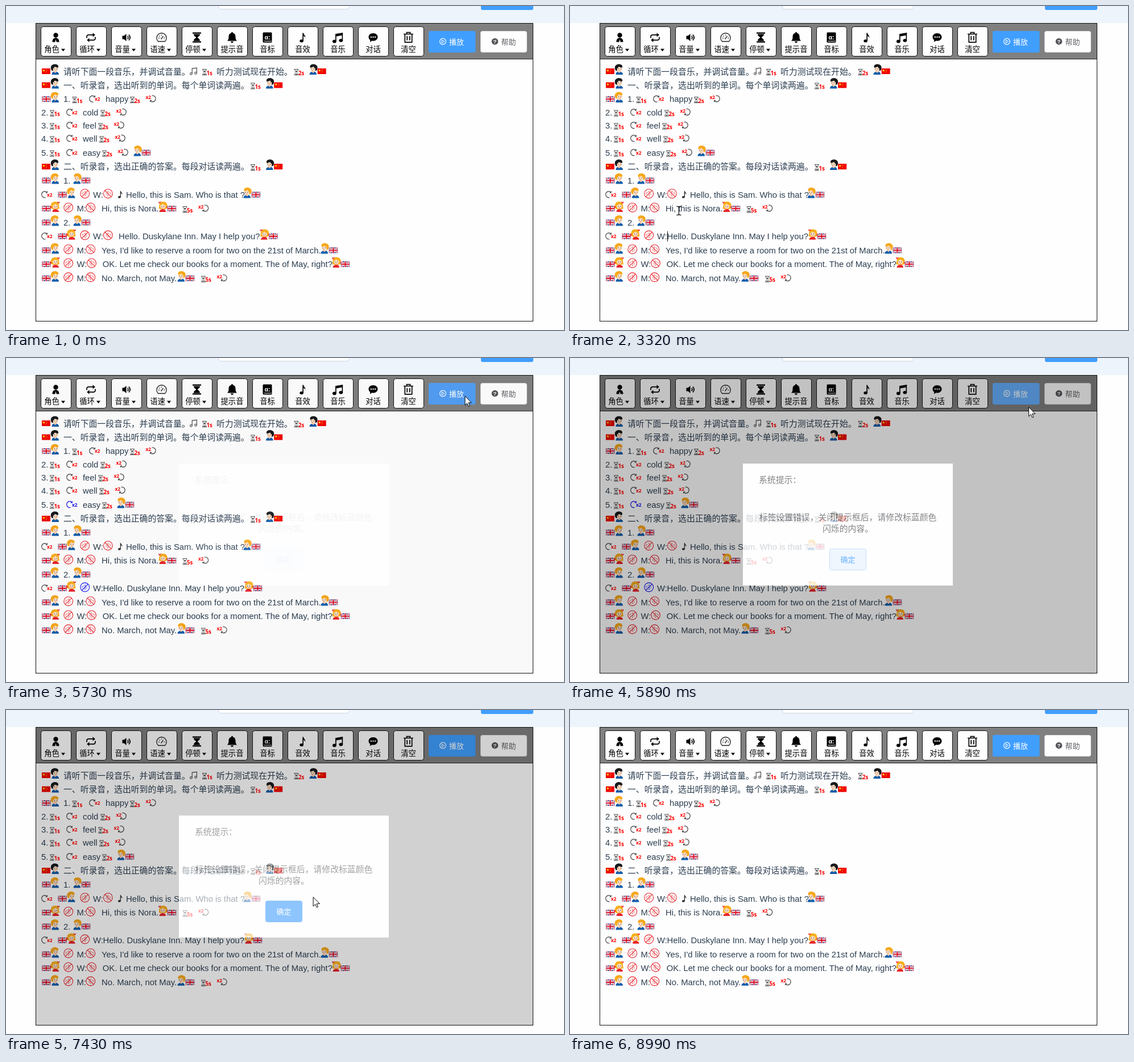
Recreate the animation shown at these times as an HTML page. Size 981x571 px, loop 9310 ms.

```html
<!DOCTYPE html>
<html lang="zh">
<head>
<meta charset="utf-8">
<title>Listening script editor</title>
<style>
html, body { margin: 0; width: 100%; height: 100%; overflow: hidden; background: #fefefe; }
svg { display: block; }
text { font-family: "Liberation Sans", "Noto Sans CJK SC", sans-serif; white-space: pre; }
.body { font-size: 14.8px; fill: #2c3e50; }
.han { font-size: 14.85px; }
.tag { font: bold 9.8px "Open Sans", sans-serif; fill: var(--r, #f00); }
.times { font-size: 8.3px; }
.line { fill: none; stroke: var(--k, #444); stroke-width: 1.2; }
.ban { fill: none; stroke: var(--r, #e8242c); stroke-width: 1.1; }
.thin { stroke-width: .6; }
.blue { --r: #1414f0; --k: #1414f0; }
.ui { font-size: 13.33px; }
.btn { font-size: 13px; font-weight: 500; }
.pop { font-size: 14.85px; fill: #606266; }
</style>
</head>
<body>
<svg id="stage" width="981" height="571" viewBox="0 0 981 571">
  <defs>
    <g id="cn">
      <path d="M0 0H15V10H0Z" fill="#f00000"/>
      <path d="M3.5 1.2l.7 1.6 1.7.1-1.3 1.1.4 1.7-1.5-.9-1.5.9.4-1.7-1.3-1.1 1.7-.1Z" fill="#ffde00"/>
      <path d="M7 1h1v1h-1zM8.3 2.6h1v1h-1zM8.3 4.6h1v1h-1zM7 6h1v1h-1z" fill="#ffc400"/>
    </g>
    <g id="uk">
      <path d="M0 0H15.5V10H0Z" fill="#1b2f7c"/>
      <path d="M0 0L15.5 10M15.5 0L0 10" stroke="#fff" stroke-width="2.4"/>
      <path d="M0 0L15.5 10M15.5 0L0 10" stroke="#d8142c" stroke-width=".9"/>
      <path d="M7.75 0V10M0 5H15.5" stroke="#fff" stroke-width="4"/>
      <path d="M7.75 0V10M0 5H15.5" stroke="#d8142c" stroke-width="2.2"/>
    </g>
    <g id="boy">
      <path d="M3 19C3 15.5 5 13.6 8.5 13.6S15.5 15 15.5 19Z" fill="#0f5cab"/>
      <path d="M7 12h4v2.5l-2 1.5-2-1.5Z" fill="#f6c9a0"/>
      <circle cx="9.2" cy="8.6" r="5" fill="#fde0c4"/>
      <path d="M2.6 11.5C.6 8 .8 3.4 4.2 1.8 6 .2 10 0 12.2 1.2 14.6 2.2 15 4.6 14.2 6.6 12 6.8 10 6 8.4 4.8 7.6 6.6 6 7.4 5.2 8.6L5.4 12.6Z" fill="var(--hair)"/>
      <path d="M8 8.2v1.4M12 8.2v1.4" stroke="#333"/>
      <path d="M9 11.4q1.2 1 2.2 0" fill="none" stroke="#c33" stroke-width=".7"/>
    </g>
    <g id="girl">
      <path d="M4 19C4 15.6 6 14 9 14S15.5 15.6 15.5 19Z" fill="#e6262c"/>
      <path d="M2.4 13C.4 9 1.2 2.4 5.4 1.4 9-.2 14 .8 15 4.2 16 7 15.6 10 16.4 13L13.4 14H5Z" fill="#f8ae1c"/>
      <circle cx="9.2" cy="8.8" r="4.6" fill="#fde0c4"/>
      <path d="M4.8 7.4C7 7 8.4 5.8 9.4 4.6 10.6 6 12 6.8 14 7.2L12.6 3H6.4Z" fill="#f8ae1c"/>
      <path d="M0 8l3.4 2.4L0 13ZM12.4 0l2 2L17 .4 16.2 4 13 3Z" fill="#ee2a2a"/>
      <path d="M7.6 8.4v1.4M11.4 8.4v1.4" stroke="#333"/>
      <path d="M8.4 11.4q1.1 1 2.2 0" fill="none" stroke="#c33" stroke-width=".7"/>
    </g>
    <g id="glass">
      <path d="M0 0H8V1H0ZM0 10H8V11H0Z" fill="#444"/>
      <path d="M1.2 1V3L3.4 5.5 1.2 8V10M6.8 1V3L4.6 5.5 6.8 8V10" fill="none" stroke="#444" stroke-width=".8"/>
      <path d="M2 3H6L4 5.4ZM2 9.8L4 7.4 6 9.8Z" fill="#444"/>
    </g>
    <g id="turn">
      <path class="line" d="M7 12A5.5 5.5 0 1 1 8.6 2"/>
      <path d="M10.4 .3V4H6.6Z" style="fill:var(--k,#444)"/>
    </g>
    <g id="mute">
      <circle class="ban" cx="8.7" cy="8.7" r="7.9"/>
      <path class="ban" d="M3.2 14.2L14.2 3.2"/>
      <path class="ban thin" d="M4 7H6.2L9.4 4V13.4L7.4 11.6M4 7V10.4M11.4 7.6q1.6 1.6 0 3.6"/>
    </g>
    <g id="note">
      <ellipse cx="2.4" cy="10.8" rx="2.5" ry="2"/>
      <path d="M3.7 0H5C5 2.4 8 3 7.4 6.8 7 5 6 4.4 5 4.2V10.8H3.7Z"/>
    </g>
    <g id="notes">
      <ellipse cx="2.4" cy="11" rx="2.4" ry="2"/><ellipse cx="10.6" cy="9.8" rx="2.4" ry="2"/>
      <path d="M3.6 1.6L13 0V9.8H11.8V3.4L4.8 4.6V11H3.6Z"/>
    </g>
    <g id="tune" fill="none" stroke="#444" stroke-width="1.1">
      <circle cx="2.4" cy="10.8" r="1.8"/><circle cx="10.6" cy="9.8" r="1.8"/>
      <path d="M4.2 10.8V1.6L12.4 .6V9.8"/>
    </g>
  </defs>
</svg>
<script>
const LOOP = 9310;
const stage = document.getElementById('stage');
const $ = id => document.getElementById(id);

const text = (x, y, s, cls, extra = '') => `<text x="${x}" y="${y}" class="${cls}" ${extra}>${s}</text>`;
const rect = (x, y, w, h, fill, extra = '') => `<rect x="${x}" y="${y}" width="${w}" height="${h}" fill="${fill}" ${extra}/>`;
const path = (d, extra = '') => `<path d="${d}" ${extra}/>`;
const use = (id, x, y, extra = '') => `<use href="#${id}" transform="translate(${x} ${y}) ${extra}"/>`;
const group = (id, s) => `<g id="${id}">${s}</g>`;

// Inline pieces; c is the middle of the text line.
const say = (x, c, s) => text(x, c + 5.3, s, /[\u4e00-\u9fff]/.test(s) ? 'body han' : 'body');
const wait = (x, c, n) => use('glass', x, c - 4) + text(x + 7.5, c + 6.5, n + 's', 'tag');
const x2 = (x, y) => text(x, y, 'x2', 'tag times');
const from = (x, c) => use('turn', x - 1, c - 7) + x2(x + 8.4, c + 3);
const to = (x, c) => use('turn', x + 7, c - 8, 'rotate(180 5.2 7)') + x2(x - .5, c);
const mute = (x, c) => use('mute', x, c - 10.5);
const unmute = (x, c) => use('mute', x + 17.4, c - 10.5, 'scale(-1 1)');
const person = (who, x, c, flip) =>
  `<g style="--hair:${who === 'cn' ? '#17191c' : '#f6a81c'}">` +
  use(who === 'girl' ? 'girl' : 'boy', flip ? x + 16 : x, c - 13, flip ? 'scale(-1 1)' : '') + '</g>';
const flag = (who, x, c) => use(who === 'cn' ? 'cn' : 'uk', x, c - 5);
const open = (who, x, c) => flag(who, x, c) + person(who, x + 14.5, c);
const close = (who, x, c) => person(who, x, c, true) + flag(who, x + 14.7, c);

function page() {
  return rect(0, 0, 981, 30, '#edf4fc') +
    rect(373.5, -10.5, 230, 16, '#fff', 'rx="4" stroke="#d3d7de"') +
    rect(835, -10, 92, 17, '#409eff', 'rx="3"') +
    rect(52.5, 30.5, 874, 525, '#fefefe', 'stroke="#111"') +
    rect(53, 31, 873, 63, '#808080') + rect(53, 93, 873, 1, '#222');
}

function tools() {
  const pen = 'fill="none" stroke="#000" stroke-width="1.7"';
  // Icons are drawn around the origin.
  const list = [
    ['角色', path('M-4.2-4a4.2 4.2 0 1 1 8.4 0a4.2 4.2 0 0 1-8.4 0M-6 8C-6 3-3.6.8 0 .8S6 3 6 8H1.2L0 3-1.2 8Z')],
    ['循环', path('M-7.5 1V-1Q-7.5-4.6-4-4.6H4M7.5-1V1Q7.5 4.6 4 4.6H-4', pen) + path('M3-8.2V-1L7.4-4.6ZM-3 8.2V1L-7.4 4.6Z')],
    ['音量', path('M-7-3H-4L0-6.5V6.5L-4 3H-7Z') + path('M2.2-2.8q2.4 2.8 0 5.6M4.4-5q4.4 5 0 10', pen)],
    ['语速', path('M-6 7A8.6 8.6 0 1 1 6 7ZM-1 3L3-2.6M-5.4 1h1.6M0-5v1.6M4 1h1.6M-4-3l1 1', 'fill="none" stroke="#222" stroke-width="1.3"')],
    ['停顿', path('M-7.5-9H7.5V-6.8H-7.5ZM-7.5 6.8H7.5V9H-7.5ZM-5.5-6H5.5C5.5-2.6 2.4-1.6 1.2 0 2.4 1.6 5.5 2.6 5.5 6.2H-5.5C-5.5 2.6-2.4 1.6-1.2 0-2.4-1.6-5.5-2.6-5.5-6Z')],
    ['提示音', path('M-1.2-9.5H1.2V-8C5-7 6-4.4 6-1 6 3 7 4.4 8.5 6H-8.5C-7 4.4-6 3-6-1-6-4.4-5-7-1.2-8ZM-2.6 7H2.6Q2 9.6 0 9.6T-2.6 7Z')],
    ['音标', rect(-8, -9, 16, 18, '#000', 'rx="1.5"') + text(-5, 3, 'α:', '', 'fill="#fff" font-size="11" font-weight="bold"') + rect(-6, 6, 13, 1, '#fff')],
    ['音效', use('note', -5, -8, 'scale(1.3)')],
    ['音乐', use('notes', -9.5, -8.5, 'scale(1.4)')],
    ['对话', path('M0-7.5C4.6-7.5 8-4.6 8-.8S4.6 6 0 6L-2 5.8-5.6 8-5.2 4.4C-7 3.2-8 1.4-8-.8-8-4.6-4.6-7.5 0-7.5Z') +
      [-3.6, 0, 3.6].map(x => `<circle cx="${x}" cy="-.8" r="1.2" fill="#fff"/>`).join('')],
    ['清空', path('M-8.5-6H8.5M-3-6V-8.8H3V-6M-6.2-6V8.4H6.2V-6M-2.3-2.5V5M2.3-2.5V5', pen)],
  ];
  return list.map(([name, icon], i) => {
    const x = 61.5 + 62 * i, mid = x + 26, drop = i < 5;
    return rect(x, 36.5, 53, 52, '#fefefe', 'rx="4" stroke="#111"') +
      `<g transform="translate(${mid} 55.5)">${icon}</g>` +
      text(drop ? mid - 7 : mid, 81.3, name, 'ui', 'text-anchor="middle"') +
      (drop ? path(`M${mid + 9.5} 75.5h7l-3.5 4.5Z`) : '');
  }).join('') +
    rect(743, 44, 82.5, 38, '#409eff', 'rx="3" id="play"') +
    `<circle cx="768" cy="62.5" r="5.3" fill="none" stroke="#fff" stroke-width="1.2"/>` +
    path('M766.4 59.8V65.2L770.8 62.5Z', 'fill="none" stroke="#fff"') +
    text(779, 67.8, '播放', 'btn', 'fill="#fff"') +
    rect(834.5, 44.5, 81, 37, '#fefefe', 'rx="3" stroke="#dcdfe6" id="help"') +
    `<circle cx="859.5" cy="62.5" r="5.8" fill="#55575b"/>` +
    text(859.5, 66, '?', '', 'fill="#fff" font-size="9.5" font-weight="bold" text-anchor="middle"') +
    text(870.5, 67.8, '帮助', 'btn', 'fill="#606266"');
}

function script() {
  let s = open('cn', 63, 115) + say(101, 115.5, '请听下面一段音乐，并调试音量。') + use('tune', 323, 108.5) +
    wait(345, 115, 1) + say(370, 115.5, '听力测试现在开始。') + wait(506.5, 115, 2) + close('cn', 533, 115);
  s += open('cn', 63, 139.5) + say(101, 140, '一、听录音，选出听到的单词。每个单词读两遍。') + wait(430, 139.5, 1) + close('cn', 456.5, 139.5);
  s += open('uk', 63, 164) + say(101, 164, '1.') + wait(116.5, 164, 1) + from(147.5, 164) + say(175, 164, 'happy') + wait(218, 164, 2) + to(246, 164);
  [['cold', 187.5, 166], ['feel', 210.5, 162], ['well', 233.5, 164], ['easy', 258.5, 169]].forEach(([word, c, x], i) => {
    const last = i === 3;
    s += say(62, c, i + 2 + '.') + wait(77, c, 1) + group('loop' + i, from(107.5, c)) + say(135, c, word) + wait(x, c, 2) +
      group('end' + i, to(x + 28, c)) + (last ? group('tail7', close('uk', 224, c)) : '');
  });
  s += open('cn', 63, 283) + say(101, 283, '二、听录音，选出正确的答案。每段对话读两遍。') + wait(430, 283, 1) + close('cn', 456.5, 283);
  [[307.5, '1.'], [381.5, '2.']].forEach(([c, n]) => s += open('uk', 63, c) + say(101, c, n) + close('uk', 118, c));

  s += from(63.5, 332.5) + open('uk', 91.5, 332.5) + mute(130, 332.5) + say(153, 332.5, 'W:') + unmute(170.7, 332.5) +
    `<g fill="#333">${use('note', 197, 326)}</g>` + say(211, 332.5, 'Hello, this is Sam. Who is that ?') + close('uk', 417, 332.5);
  s += open('girl', 63, 357) + mute(101, 357) + say(124.5, 357, 'M:') + unmute(140, 357) + say(168, 357, 'Hi, this is Nora.') +
    close('girl', 269, 357) + wait(310.5, 357, 5) + to(338.5, 357);
  s += from(63.5, 405.8) + open('girl', 91.5, 405.8) + group('ban', mute(130, 405.8)) + say(153, 405.8, 'W:') + group('unban', unmute(170.7, 405.8)) +
    group('tail13', say(198, 405.8, 'Hello. Duskylane Inn. May I help you?') + close('girl', 447.5, 405.8));
  const reply = (who, c, role, x, line, end) =>
    open(who, 63, c) + mute(101, c) + say(124.5, c, role) + unmute(x, c) + say(x + 28, c, line) + close(who, end, c);
  s += reply('uk', 430.5, 'M:', 140, "Yes, I'd like to reserve a room for two on the 21st of March.", 553);
  s += reply('girl', 455, 'W:', 141.8, 'OK. Let me check our books for a moment. The of May, right?', 574);
  s += reply('uk', 479.8, 'M:', 140, 'No. March, not May.', 301) + wait(343, 479.8, 5) + to(371, 479.8);
  return s;
}

function dialog() {
  const mid = 'text-anchor="middle"';
  return rect(53, 31, 873, 524, '#000', 'opacity=".3"') + rect(304, 186, 369, 215, '#fff') +
    text(332, 220, '系统提示：', 'pop') +
    text(488.5, 286, '标签设置错误，关闭提示框后，请修改标蓝颜色', 'pop', mid) +
    text(488.5, 305.5, '闪烁的内容。', 'pop', mid) +
    rect(456.5, 336.5, 64, 37, '#ecf5ff', 'rx="3" stroke="#b3d8ff" id="ok"') +
    text(488.5, 359.8, '确定', 'btn', mid + ' id="okText"');
}

stage.insertAdjacentHTML('beforeend', page() + tools() + script() +
  rect(0, 0, 1, 18, '#111', 'id="caret"') + group('dialog', dialog()) +
  group('arrow', path('M0 0V16.2L3.7 12.7 6.2 18.2 8.5 17.2 6.1 11.7H11.3Z', 'fill="#fff" stroke="#000"')) +
  group('beam', path('M-4-7.5H-1.5L0-6.5 1.5-7.5H4M0-6.5V6.5M-4 7.5H-1.5L0 6.5 1.5 7.5H4', 'fill="none" stroke="#000" stroke-width="1.2"')));

// Pointer stops: time, x, y.
const stops = [
  [140, 850, 556], [300, 578, 494], [610, 578, 494], [1540, 201, 404], [1770, 199, 403], [1860, 193, 404],
  [2240, 193, 404], [2550, 195, 426], [2930, 195, 426], [3470, 190, 336], [3640, 190, 336], [4400, 228, 258],
  [4570, 229, 260], [5050, 229, 260], [5160, 680, 250], [5240, 812, 260], [5320, 858, 93], [5410, 850, 66],
  [5580, 807, 67], [5730, 807, 67], [5880, 807, 85], [6050, 800, 110],
  [6800, 495, 352], [7300, 495, 355], [7430, 540, 330], [7970, 600, 150], [8250, 885, 330], [8670, 890, 536]];
const edits = [1860, 2400, 2930, 4570, 4870, 5050];

const clamp = v => Math.max(0, Math.min(1, v));

// CSS "ease" timing curve.
function ease(p) {
  p = clamp(p);
  let lo = 0, hi = 1;
  for (let i = 0; i < 24; i++) {
    const u = (lo + hi) / 2;
    if (.75 * u * (1 - u) + u ** 3 < p) lo = u; else hi = u;
  }
  return .3 * lo * (1 - lo) ** 2 + 3 * lo * lo * (1 - lo) + lo ** 3;
}

function pointer(t) {
  const i = stops.findIndex(s => s[0] > t);
  const [t0, x0, y0] = stops[i - 1], [t1, x1, y1] = stops[i];
  const k = (t - t0) / (t1 - t0);
  return [x0 + (x1 - x0) * k, y0 + (y1 - y0) * k];
}

const show = (id, on) => { $(id).style.display = on ? '' : 'none'; };
const move = (id, x, y) => $(id).setAttribute('transform', `translate(${x} ${y})`);
const fill = (id, color) => $(id).setAttribute('fill', color);

function render(t) {
  const dx13 = t < 2400 ? 0 : t < 2930 ? -4.5 : -27.5;
  const dx7 = t < 4870 ? 0 : t < 5050 ? -4 : -29;
  move('tail13', dx13, 0);
  move('tail7', dx7, 0);
  show('unban', t < 2930);
  show('end3', t < 5050);

  const edit = edits.filter(e => e <= t).pop();
  show('caret', t >= 1860 && t < 5400 && (t - edit) % 1060 < 530);
  const low = t < 4570;
  $('caret').setAttribute('height', low ? 18 : 24);
  move('caret', Math.round(low ? 198 + dx13 : 216 + dx7), low ? 397 : 247);

  const blue = t >= 5580 && Math.floor((t - 5490) / 500) % 2 === 0;
  for (const id of ['loop3', 'ban']) $(id).classList.toggle('blue', blue);

  const fade = t < 7000 ? ease((t - 5700) / 400) : 1 - ease((t - 7330) / 400);
  $('dialog').style.opacity = fade;
  show('dialog', fade > 0);

  const seen = t >= 140 && t < 8670;
  const [x, y] = seen ? pointer(t) : [0, 0];
  const over = (left, right) => x > left && x < right && y > 44 && y < 82;
  const pressed = t >= 5540 && t < 5800, focused = t >= 5800 && t < 7200;
  fill('play', pressed ? '#529ff4' : focused || over(743, 825) ? '#66b1ff' : '#409eff');
  fill('help', over(834, 916) ? '#ecf5ff' : '#fefefe');
  const hot = t >= 6700;
  fill('ok', hot ? '#409eff' : '#ecf5ff');
  $('ok').setAttribute('stroke', hot ? '#409eff' : '#b3d8ff');
  fill('okText', hot ? '#fff' : '#409eff');

  const typing = !(t >= 5700 && t < 7730) && y > 94 && y < 555 && x > 52 && x < 926;
  show('arrow', seen && !typing);
  show('beam', seen && typing);
  move(typing ? 'beam' : 'arrow', x, y);
}

const start = performance.now();
function tick() {
  render((performance.now() - start) % LOOP);
  requestAnimationFrame(tick);
}
tick();
</script>
</body>
</html>
```
